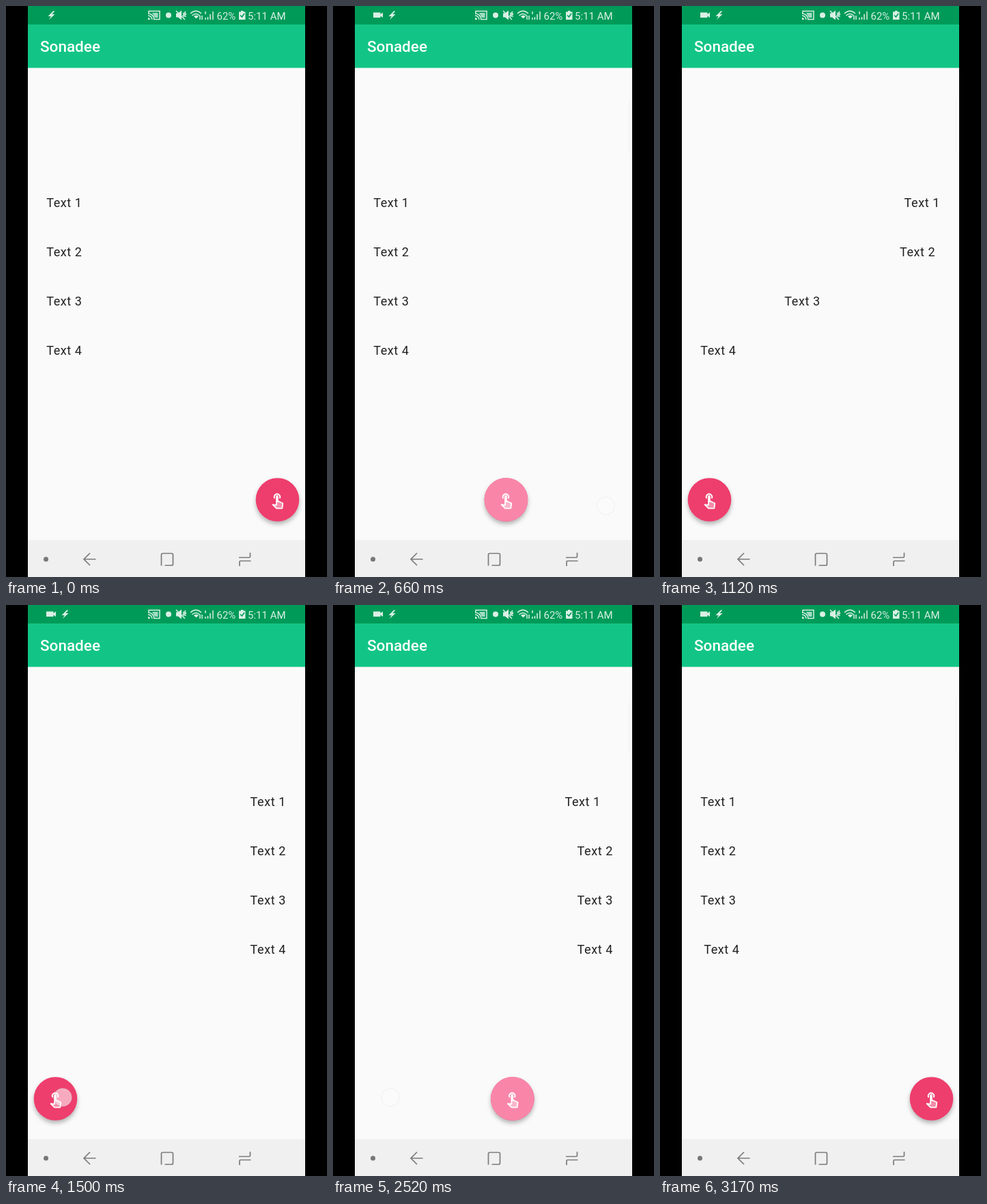
Recreate the animation shown at these times as an HTML page. Size 470 by 835 pixels, loop 3.23 s.

```html
<!DOCTYPE html>
<html lang="en">
<head>
<meta charset="utf-8">
<title>Staggered list</title>
<style>
  html, body { margin: 0; width: 100%; height: 100%; overflow: hidden; background: #000; }
  svg { display: block; width: 470px; height: 835px; font-family: Roboto, "Noto Sans", sans-serif; }
  #rows text { font-size: 18.05px; letter-spacing: .564px; fill: #212121; }
  .status { fill: #d9f0e5; }
  .lines { fill: none; stroke: #d9f0e5; stroke-width: 1.5; }
  .nav { fill: none; stroke: #7b7b7b; stroke-width: 1.7; }
  .shadow { filter: drop-shadow(0 4px 3px rgba(0, 0, 0, .28)); }
</style>
</head>
<body>
<svg viewBox="0 0 470 835">
  <rect width="470" height="835"/>
  <rect x="32" width="406" height="835" fill="#fafafa"/>
  <rect x="32" width="406" height="27.5" fill="#009a58"/>
  <rect x="32" y="27" width="406" height="63.5" fill="#12c586"/>
  <rect x="32" y="781" width="406" height="54" fill="#f0f0f0"/>
  <path d="M433.5 136V216" stroke="#f2f2f2"/>

  <g class="status">
    <path id="camera" d="M59 9.5h10.5v2.5l3.5-2.5v7.5l-3.5-2.5v2.5H59z"/>
    <path id="bolt" d="M3-6.5-5 1.5H-.8L-3.5 6.5 5-1.5H.8L4.5-5.5z"/>
    <path d="M208 20v-3a3 3 0 0 1 3 3z"/>
    <path d="M214 10h8.500v7H218z" opacity=".75"/>
    <circle cx="238" cy="13.500" r="4"/>
    <path d="M249 10.500h3l5-4v14l-5-4h-3z"/>
    <path d="M341 8.500h3V7h3.500v1.500h3V20H341z"/>
    <path d="M278 18l-3-3q3.500-2.500 7 0l-3 3z"/>
    <text x="308.500" y="19.500" font-size="15">62%</text>
    <text x="354" y="19.500" font-size="15">5:11 AM</text>
  </g>
  <g class="lines">
    <path d="M209 11V7.500h16v12h-9M208 14a6 6 0 0 1 6 6M208 11a9 9 0 0 1 9 9"/>
    <path d="M249 7l13 13M259 10l2 2-2 2 2 2M263 8l-1.500 2 2 2-2 2 2 2"/>
    <path d="M270 11q8-7.500 16 0M272.500 14q5.500-5 11 0M284 14v6M287 14v6"/>
    <path d="M292 8v4M295.500 16v4M299 12v8M303 8v12M292 17v3"/>
  </g>
  <path d="M343 13.500l2.500 2.500 3.500-5" fill="none" stroke="#009a58" stroke-width="1.500"/>
  <text x="50" y="67" font-size="22.500" font-weight="500" fill="#fff">Sonadee</text>

  <g id="rows"></g>

  <g id="fab">
    <circle class="shadow" r="31.800" fill="#ee3e6d"/>
    <circle id="ripple" r="31.800" fill="#f986a9"/>
    <circle id="dim" r="31" fill="#ab6d80"/>
    <g transform="translate(-13.500 -13.500) scale(1.128)" fill="none" stroke="#fff" stroke-linejoin="round">
      <path d="M8.400 10.300a3.700 3.700 0 1 1 6.200 0" stroke-width="1.700"/>
      <path d="M10.700 18.900V7.500a.8.8 0 0 1 1.600 0V14.200h1.500l5.100 2.400-.9 6.600H10.700L5.900 18.400z"
            fill="#fff" fill-opacity=".4" stroke-width="1.600"/>
    </g>
  </g>
  <circle id="touch" r="12.800" fill="#fff" fill-opacity=".56" stroke="#ddd" stroke-opacity=".55" stroke-width="1.500"/>

  <circle cx="58.500" cy="809" r="3.500" fill="#777"/>
  <g class="nav">
    <path d="M131.500 809H114.500M123 800l-9 9 9 9"/>
    <path d="M227.500 818.500V802.500a2 2 0 0 1 2-2h13a2 2 0 0 1 2 2v13.500a2 2 0 0 1-2 2H232.500"/>
    <path d="M341 806.500h15a1.500 1.500 0 0 0 1.500-1.500V799.500M358.500 811.500h-15a1.500 1.500 0 0 0-1.500 1.500v6"/>
  </g>
</svg>
<script>
const LOOP = 3230;
const STAGGER = 148;
const byId = id => document.getElementById(id);
const clamp = v => Math.min(1, Math.max(0, v));
const ramp = (t, from, to) => clamp((t - from) / (to - from));
const pulse = (t, a, b, c, d) => ramp(t, a, b) * (1 - ramp(t, c, d));

// Screen updates: [first, last, count], evenly spaced
const steps = [[0, 70, 2], [147, 300, 3], [450, 660, 4], [720, 850, 3], [910, 980, 2],
  [1045, 1500, 8], [2330, 2390, 2], [2455, 2780, 6], [2840, 2900, 2], [2967, 3170, 4]]
  .flatMap(([a, b, n]) => Array.from({ length: n }, (_, i) => a + (b - a) * i / (n - 1)));

// Cubic bezier (.4, 0, .2, 1)
function ease(x) {
  let lo = 0, hi = 1;
  for (let i = 0; i < 24; i++) {
    const s = (lo + hi) / 2, r = 1 - s;
    if (1.2 * s * r * r + .6 * s * s * r + s ** 3 < x) lo = s; else hi = s;
  }
  return x <= 0 ? 0 : x >= 1 ? 1 : lo * lo * (3 - 2 * lo);
}

const travel = (t, out, back, duration) =>
  ease(ramp(t, out, out + duration)) - ease(ramp(t, back, back + duration));

const rows = [1, 2, 3, 4].map((n, i) => {
  const row = document.createElementNS("http://www.w3.org/2000/svg", "text");
  row.textContent = "Text " + n;
  row.setAttribute("y", 293.8 + i * 72.2);
  byId("rows").append(row);
  return row;
});

const move = (el, x, y) => el.setAttribute("transform", `translate(${x} ${y})`);
const fade = (el, v) => el.setAttribute("opacity", v);

function draw(time) {
  const t = steps.findLast(s => s <= time + .01);

  rows.forEach((row, i) => {
    const delay = i * STAGGER;
    row.setAttribute("x", 59.2 + 298.4 * travel(t, 719 + delay, 2476.5 + delay, 300));
  });

  move(byId("fab"), 397.5 - 325 * travel(t, 537, 2375, 375), 722);
  fade(byId("ripple"), pulse(t, 440, 590, 860, 1110) + pulse(t, 2380, 2520, 2780, 2910));
  fade(byId("dim"), pulse(t, 2700, 2780, 2780, 2860));

  const second = t > 1000;
  move(byId("touch"), second ? (t < 2330 ? 83 : 84) : 399.5, second ? 720 : 731);
  fade(byId("touch"), second ? pulse(t, 1280, 1500, 2300, 2680) : pulse(t, 40, 220, 500, 800));

  const recording = t >= 70;
  fade(byId("camera"), recording ? 1 : 0);
  move(byId("bolt"), recording ? 86.5 : 66.5, 13.5);
}

const start = performance.now();
function tick() {
  draw((performance.now() - start) % LOOP);
  requestAnimationFrame(tick);
}
tick();
</script>
</body>
</html>
```
